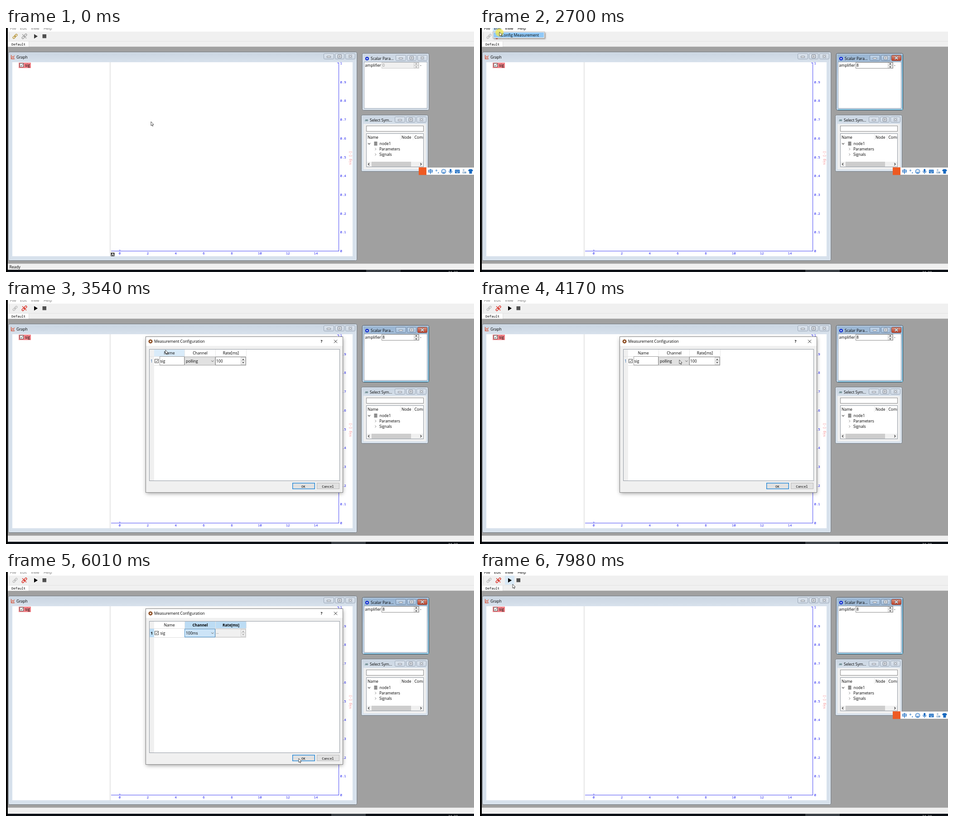
An HTML page with a canvas that plays this animation: 1033x542 px, repeating every 8 s.

```html
<!DOCTYPE html>
<html lang="en">
<head>
<meta charset="utf-8">
<title>Measurement setup</title>
<style>
html, body { margin: 0; width: 1033px; height: 542px; overflow: hidden; background: #a0a0a0; }
canvas { display: block; }
</style>
</head>
<body>
<canvas id="stage" width="1033" height="542"></canvas>
<script>
const W = 1033, H = 542, LOOP = 8000;
const main = document.getElementById('stage').getContext('2d');
const layer = document.createElement('canvas');
layer.width = W;
layer.height = H;
const layerCtx = layer.getContext('2d');
let g = main;

const UI = '8.5px "Open Sans", "Noto Sans", sans-serif';
const BOLD = 'bold 8.3px "Open Sans", "Noto Sans", sans-serif';
const MONO = '7.4px "Noto Sans Mono", "Liberation Mono", monospace';
const BLUE = '#1414f0', AXIS = '#3434f3';

// time, x, y, easing used to arrive
const linear = k => k, inOut = k => k * k * (3 - 2 * k), out = k => k * (2 - k), soft = k => k ** 1.4;
const path = [
  [0, 320, 208], [220, 320, 208], [1020, 17, 21, inOut], [1590, 17, 21], [2150, 38, 3, inOut],
  [2420, 38, 3], [2600, 43, 9, inOut], [2880, 43, 9], [3540, 352, 111, inOut], [3640, 355, 114],
  [4150, 440, 133, inOut], [4480, 440, 133], [4830, 415, 160, inOut], [4980, 415, 160],
  [5780, 637, 391, soft], [5990, 646, 414, out], [6680, 646, 414], [7470, 211, 79, soft], [7980, 72, 27, out]
];
const clicks = [[1070, 1250], [2180, 2300], [2680, 2880], [4180, 4300], [4860, 4960], [6080, 6240]];

function pointer(t) {
  const i = path.findIndex(p => p[0] > t);
  if (i < 0) return path[path.length - 1].slice(1, 3);
  const a = path[i - 1], b = path[i];
  const k = (b[3] || linear)((t - a[0]) / (b[0] - a[0]));
  return [a[1] + (b[1] - a[1]) * k, a[2] + (b[2] - a[2]) * k];
}
const between = (v, a, b) => v >= a && v < b;
const clamp = v => Math.max(0, Math.min(1, v));

function rect(x, y, w, h, fill, stroke) {
  if (fill) { g.fillStyle = fill; g.fillRect(x, y, w, h); }
  if (stroke) { g.strokeStyle = stroke; g.lineWidth = 1; g.strokeRect(x + 0.5, y + 0.5, w - 1, h - 1); }
}
function text(s, x, y, color = '#000', font = UI, align = 'left') {
  g.font = font;
  g.fillStyle = color;
  g.textAlign = align;
  g.fillText(s, x, y);
}
function line(pts, color, width = 1, close) {
  g.beginPath();
  for (let i = 0; i < pts.length; i += 2) g.lineTo(pts[i], pts[i + 1]);
  if (close) g.closePath();
  g.strokeStyle = color;
  g.lineWidth = width;
  g.stroke();
}
function poly(pts, fill) {
  g.beginPath();
  for (let i = 0; i < pts.length; i += 2) g.lineTo(pts[i], pts[i + 1]);
  g.closePath();
  g.fillStyle = fill;
  g.fill();
}
function disc(x, y, r, fill, stroke, width = 1) {
  g.beginPath();
  g.arc(x, y, r, 0, 7);
  if (fill) { g.fillStyle = fill; g.fill(); }
  if (stroke) { g.strokeStyle = stroke; g.lineWidth = width; g.stroke(); }
}
function round(x, y, w, h, r, fill, stroke, width = 1) {
  g.beginPath();
  g.roundRect(x, y, w, h, r);
  if (fill) { g.fillStyle = fill; g.fill(); }
  if (stroke) { g.strokeStyle = stroke; g.lineWidth = width; g.stroke(); }
}
function fade(y1, y2, c1, c2) {
  const f = g.createLinearGradient(0, y1, 0, y2);
  f.addColorStop(0, c1);
  f.addColorStop(1, c2);
  return f;
}

function check(x, y) {
  rect(x, y, 9, 9, '#fff', '#555');
  line([x + 2, y + 4.5, x + 4, y + 6.5, x + 7.2, y + 2.3], '#333');
}
function spinner(x, y, w, h, value, on) {
  rect(x, y, w, h, on ? '#fff' : '#f0f0f0', on ? '#8c8c8c' : '#cccccc');
  const bx = x + w - 12, mid = y + h / 2, c = on ? '#333' : '#999';
  rect(bx, y + 1, 11, h / 2 - 1, '#f0f0f0', '#d0d0d0');
  rect(bx, Math.floor(mid), 11, h / 2 - 1, '#f0f0f0', '#d0d0d0');
  const cx = bx + 5.5;
  poly([cx - 2.3, mid - 2.3, cx, mid - 5, cx + 2.3, mid - 2.3], c);
  poly([cx - 2.3, mid + 2.5, cx, mid + 5, cx + 2.3, mid + 2.5], c);
  text(value, x + 2, mid + 3.2, on ? '#000' : '#8a8a8a');
}

function titleButtons(x, y, hot) {
  [[0, 23], [25, 21], [48, 22]].forEach(([dx, w], i) => {
    const red = hot && i === 2;
    round(x + dx + 0.5, y + 0.5, w - 1, 12, 2,
      red ? fade(y, y + 12, '#dc9a88', '#bf4028') : hot ? fade(y, y + 12, '#c3d5e8', '#a3bedb') : fade(y, y + 12, '#dde5ee', '#cfd9e5'),
      red ? '#7c3a30' : hot ? '#71869f' : '#9aa6b5');
    const cx = x + dx + w / 2, cy = y + 6.5;
    const ink = '#5d6674';
    if (i === 0) round(cx - 4, cy - 0.5, 8, 3, 0.5, '#f6f8fa', ink, 0.8);
    if (i === 1) { round(cx - 4, cy - 3.5, 8, 7, 0.5, '#f6f8fa', ink, 0.9); round(cx - 1.5, cy - 1, 3, 2, 0, null, ink, 0.8); }
    if (i === 2) {
      for (const [c, lw] of [[ink, 2.8], ['#f8fafc', 1.4]]) {
        line([cx - 3.3, cy - 3, cx + 3.3, cy + 3], c, lw);
        line([cx + 3.3, cy - 3, cx - 3.3, cy + 3], c, lw);
      }
    }
  });
}
function frameWindow(x, y, w, h, title, tx, ty, bx, by, hot) {
  round(x + 0.5, y + 0.5, w - 1, h - 1, 3,
    hot ? fade(y, y + 60, '#98b4d2', '#bbd1e8') : fade(y, y + 22, '#c9d4e1', '#d7e1ec'), hot ? '#33475c' : '#6a7683');
  round(x + 1.5, y + 1.5, w - 3, h - 3, 2, null, '#eaf0f6');
  if (hot) line([x + w - 1.5, y + 4, x + w - 1.5, y + h - 1.5, x + 4, y + h - 1.5], '#68cdea');
  text(title, tx, ty);
  titleButtons(bx, by, hot);
}

function chain(cx, cy, color, broken) {
  g.save();
  g.translate(cx, cy);
  g.rotate(-Math.PI / 4);
  const d = broken ? 0.8 : 0;
  round(-6 - d, -2, 6.2, 4, 2, null, color, 1.3);
  round(d - 0.2, -2, 6.2, 4, 2, null, color, 1.3);
  if (!broken) line([-2.5, 0, 2.5, 0], color, 1.2);
  g.restore();
  if (broken) line([cx - 4.5, cy - 4.5, cx + 4.5, cy + 4.5], color, 1.2);
}

function shell(s) {
  rect(0, 0, W, H, '#a0a0a0');
  rect(4, 0, W, 8, '#fff');
  rect(4, 8, W, 33.5, '#f0f0f0');
  rect(4, 29, W, 1, '#e2e2e2');
  rect(4, 30, 46, 11.5, '#fff');
  rect(50, 30, 1, 11, '#dcdcdc');
  text('Default', 12, 38.6, '#000', MONO);

  const ink = s.focused ? '#000' : '#777';
  if (s.editHot) rect(28, 0, 20, 8, '#cce8ff');
  [['File', 9], ['Edit', 31], ['View', 55], ['Help', 83]].forEach(([m, x]) => text(m, x, 4.3, ink));

  if (s.linkHot) rect(11, 9, 18, 19, '#d9e9f6');
  if (s.playHot) rect(55, 8, 21, 20, '#d9e9f6');
  for (let y = 11; y < 27; y += 2) rect(7, y, 1, 1, '#d0d0d0');
  chain(20, 18.5, s.linked ? '#bdbdbd' : '#b8963a');
  chain(40.5, 18.5, s.linked ? '#d92b20' : '#9c9c9c', true);
  poly([62, 13.5, 62, 23.5, 70, 18.5], s.linked ? '#000' : '#3c3c3c');
  rect(80.5, 14, 8.5, 8.5, '#505050');

  rect(4, 523.5, W, 13.5, '#f0f0f0');
  if (s.ready) text('Ready', 7.5, 534);
  rect(0, 537, W, 5, '#0d1116');
  rect(s.taskX, 537, 76, 5, '#3a3f45');
  text('21:20', 976, 547, '#d8d8d8');
  rect(0, 0, 4, H, '#000');
}

function graph(s) {
  frameWindow(5, 53, 770, 464, 'Graph', 23, 68, 701, 56.5);
  line([11.5, 60, 11.5, 68.5, 19, 68.5], '#d2553c', 1.3);
  line([12.5, 67, 15, 63.5, 16.5, 65.5, 18.5, 61], '#e0674d', 1.2);
  line([13, 62, 18, 67], '#e0674d');
  rect(14, 76, 751, 431, '#fff');
  rect(228.5, 76, 3, 431, '#ececec');
  rect(28, 77, 27, 12, '#f28288');
  check(30, 78);
  text('sig', 42, 86);

  line([232, 495.5, 735, 495.5], AXIS, 0.9);
  line([734.6, 77, 734.6, 496], AXIS, 0.9);
  line([251.3, 492, 251.3, 495], AXIS, 0.9);
  line([731, 77.5, 735, 77.5], AXIS, 0.9);
  for (let i = 0; i < 8; i++) text(2 * i, 251 + 61.85 * i, 503, BLUE, MONO, 'center');
  for (let i = 0; i <= 10; i++) text(i % 10 ? (i / 10).toFixed(1) : i / 10, 737.5, 498 - 41.7 * i, BLUE, MONO);
  g.save();
  g.translate(762, 304);
  g.rotate(-Math.PI / 2);
  text('sig [-]', 0, 0, '#f28288', MONO);
  g.restore();
  if (s.autoMark) {
    rect(231.5, 499, 8, 8, '#303030');
    text('A', 235.5, 505.6, '#fff', BOLD, 'center');
  }
}

function scalar(s) {
  frameWindow(786, 56, 148, 127, 'Scalar Para...', 805, 71, 860, 60, s.linked);
  disc(797, 68, 4, '#1530d0');
  disc(797, 68, 1.5, '#fff');
  rect(790, 75, 140, 104, '#fff', '#9ba6b3');
  text('amplifier', 792.5, 86);
  spinner(829, 76, 83, 14, s.linked ? '8' : '0', s.linked);
  text('-', 914, 86);
}

function symbols() {
  frameWindow(784, 193, 148, 126, 'Select Sym...', 803, 208, 858, 197);
  text('.00', 791.5, 207, '#2d5a58', 'bold 5.5px "Liberation Sans", sans-serif');
  rect(789, 213, 138, 101, '#f0f0f0');
  rect(795, 217, 127, 13, '#fff', '#8c8c8c');
  rect(795, 234, 127, 75, '#fff', '#939aa3');
  text('Name', 798, 245.5);
  text('Node', 873, 245.5);
  g.save();
  g.beginPath();
  g.rect(796, 235, 125, 73);
  g.clip();
  text('Comment', 901.5, 245.5);
  g.restore();
  rect(870, 236, 1, 13, '#e6e6e6');
  rect(898, 236, 1, 13, '#e6e6e6');
  line([799, 255.5, 801.5, 258.5, 804, 255.5], '#333', 1.1);
  for (let i = 0; i < 3; i++) round(812.3, 252.6 + i * 3, 7.4, 2.5, 1.2, '#777');
  text('node1', 824.5, 260);
  ['Parameters', 'Signals'].forEach((n, i) => {
    const y = 269 + i * 12;
    line([814.5, y - 2.5, 817, y, 814.5, y + 2.5], '#888');
    text(n, 824, y + 3);
  });
  rect(796, 297, 125, 11, '#f0f0f0');
  rect(807, 297, 87, 11, '#cdcdcd');
  line([802, 300, 799.5, 302.5, 802, 305], '#333', 1.2);
  line([914.5, 300, 917, 302.5, 914.5, 305], '#333', 1.2);
}

function inputBar() {
  const c = '#1769c0';
  rect(912, 310, W, 16, '#fff');
  rect(911, 309.5, 17, 17, '#ee5a22');
  text('中', 937, 322.5, c, 'bold 11px "Noto Sans CJK SC", "Noto Sans CJK", sans-serif', 'center');
  disc(950, 316.5, 1.4, null, c);
  text(',', 953, 321.5, c, 'bold 11px "Open Sans", sans-serif');
  disc(966, 318.5, 4.7, null, c, 1.2);
  disc(964.2, 317.3, 0.8, c);
  disc(967.8, 317.3, 0.8, c);
  g.beginPath();
  g.arc(966, 318.8, 2.5, 0.3, 2.84);
  g.stroke();
  round(979.3, 313, 4, 7, 2, c);
  line([977.5, 317.5, 978.5, 321, 984, 321, 985, 317.5], c);
  rect(980.8, 321, 1, 3, c);
  round(991, 314.8, 10.5, 8, 1, c);
  for (let i = 0; i < 6; i++) rect(992.5 + (i % 3) * 3, 316.5 + (i > 2) * 2, 1.5, 1, '#fff');
  rect(994, 320.7, 4.5, 1, '#fff');
  disc(1010, 315.5, 2, '#a9c3dc');
  round(1007, 318.5, 6, 5, 2, '#b9cde0');
  rect(1012, 319, 4, 4, '#8fb0d0');
  poly([1020, 316, 1023, 313.5, 1028, 313.5, 1031, 316, 1029.5, 318.5, 1028.5, 318, 1028.5, 323.5, 1022.5, 323.5, 1022.5, 318, 1021.5, 318.5], c);
}

function editMenu(s) {
  g.save();
  g.shadowColor = 'rgba(0,0,0,.4)';
  g.shadowBlur = 3;
  g.shadowOffsetX = g.shadowOffsetY = 1.5;
  rect(28, 8, 115, 15, '#f2f2f2');
  g.restore();
  rect(28, 8, 115, 15, null, '#b5b5b5');
  if (s.itemHot) rect(30, 10, 111, 11, '#91c9f7');
  text('Config Measurement', 47, 18.5);
}

function dialog(s, x, y) {
  g.save();
  g.shadowColor = 'rgba(0,0,0,.4)';
  g.shadowBlur = 9;
  g.shadowOffsetY = 2;
  rect(308.5, 81.5, 435.5, 346.5, '#f0f0f0');
  g.restore();
  rect(309, 82, 434, 20, '#fff');
  rect(308, 81, 436, 347, null, '#858585');
  for (let i = 0; i < 8; i++) {
    const a = i * Math.PI / 4;
    disc(319 + Math.cos(a) * 3.6, 92 + Math.sin(a) * 3.6, 1.2, '#8a4a1f');
  }
  disc(319, 92, 2.7, null, '#8a4a1f', 2);
  text('Measurement Configuration', 327, 95);
  text('?', 696.5, 95, '#000', BOLD, 'center');
  line([724, 88.5, 731, 95.5], '#222');
  line([731, 88.5, 724, 95.5], '#222');

  rect(316, 109, 421, 293, '#fff', '#939aa3');
  rect(317, 110, 10, 291, '#f0f0f0');
  ['Name', 'Channel', 'Rate[ms]'].forEach((n, i) => {
    const cx = 327 + i * 68, picked = s.row && i > 0;
    const hot = between(x, cx, cx + 68) && between(y, 110, 126);
    if (picked || hot) rect(cx, 110, 67.5, 15, picked ? '#bcdcf4' : '#d9ebf9');
    rect(cx + 67, 110, 1, 15, '#e6e6e6');
    text(n, cx + 33.5, 121, '#000', picked ? BOLD : UI, 'center');
  });
  rect(317, 125, 213, 1, '#e2e2e2');
  rect(327, 145, 203, 1, '#dedede');
  if (s.row) rect(317, 126, 10, 19, '#bcdcf4');
  text('1', 321.5, 138.7, s.row ? '#000' : '#1d5fa8', s.row ? BOLD : UI, 'center');
  check(328, 131);
  if (!s.row) rect(339, 125, 55, 20, '#fff', '#999');
  text('sig', 340.5, 138.5);
  rect(394, 126, 68, 19, s.row ? '#cce4f7' : '#e1e1e1', s.row ? '#4a90c8' : '#b8b8b8');
  text(s.chosen ? '100ms' : 'polling', 397, 138.5);
  line([453.3, 134.5, 455.8, 137, 458.3, 134.5], '#555');
  spinner(462, 126, 68, 19, s.chosen ? '--' : '100', !s.chosen);

  rect(632, 406, 50, 14, '#e1e1e1');
  g.strokeStyle = '#1480d6';
  g.lineWidth = 1.3;
  g.strokeRect(632.7, 406.7, 48.6, 12.8);
  rect(686, 406, 50, 14, '#e1e1e1', '#b8b8b8');
  text('OK', 656.5, 416.5, '#000', MONO, 'center');
  text('Cancel', 710.5, 416.5, '#000', MONO, 'center');

  if (s.list) {
    g.save();
    g.shadowColor = 'rgba(0,0,0,.35)';
    g.shadowBlur = 3;
    g.shadowOffsetX = g.shadowOffsetY = 0.8;
    rect(394, 145, 68.5, 33.5, '#fff');
    g.restore();
    line([394.5, 145, 394.5, 178, 462, 178, 462, 145], '#666', 0.9);
    ['10ms', '100ms', 'polling'].forEach((n, i) => {
      const top = 145.3 + i * 10.8, hot = between(y, top, top + 10.8);
      if (hot) rect(395, Math.round(top), 66.5, 11, '#0078d7');
      text(n, 397, top + 8.5, hot ? '#fff' : '#000');
    });
  }
}

function cursor(x, y) {
  const shape = [0, 0, 0, 9, 2, 7.2, 3.4, 10.2, 4.7, 9.6, 3.4, 6.7, 6, 6.5].map((v, i) => v + (i % 2 ? y : x));
  poly(shape, '#fff');
  line(shape, '#222', 0.8, true);
}

function draw(t) {
  const [x, y] = pointer(t);
  const modal = between(t, 2900, 6300);
  const s = {
    focused: t >= 1070 && !modal,
    linked: t >= 1190,
    ready: t < 2230,
    taskX: t < 1070 ? 795 : 718,
    linkHot: t < 1190 && between(x, 11, 29) && between(y, 8, 28),
    playHot: t > 7000 && between(x, 55, 76) && between(y, 8, 28),
    editHot: between(t, 1590, 2880) && (t > 2250 || x > 28 && y < 8),
    autoMark: (t < 1070 || t > 6680) && between(x, 232, 765) && between(y, 76, 507),
    itemHot: t > 2420 && y > 8,
    row: t >= 4200,
    chosen: t >= 4980,
    list: between(t, 4260, 5025)
  };
  g = main;
  shell(s);
  graph(s);
  scalar(s);
  symbols();
  if (!modal) inputBar();
  if (between(t, 2250, 2880)) editMenu(s);

  const alpha = t < 4000 ? clamp((t - 2920) / 200) : clamp((6550 - t) / 250) ** 2;
  if (alpha > 0) {
    g = layerCtx;
    g.clearRect(0, 0, W, H);
    dialog(s, x, y);
    g = main;
    g.save();
    const k = 0.96 + 0.04 * alpha;
    g.globalAlpha = alpha;
    g.translate(526 * (1 - k), 254.5 * (1 - k));
    g.scale(k, k);
    g.drawImage(layer, 0, 0);
    g.restore();
  }
  if (clicks.some(([a, b]) => between(t, a, b))) disc(x, y + 1, 9, 'rgba(255,236,40,.6)');
  cursor(x, y);
}

const start = performance.now();
function tick() {
  draw((performance.now() - start) % LOOP);
  requestAnimationFrame(tick);
}
tick();
</script>
</body>
</html>
```
